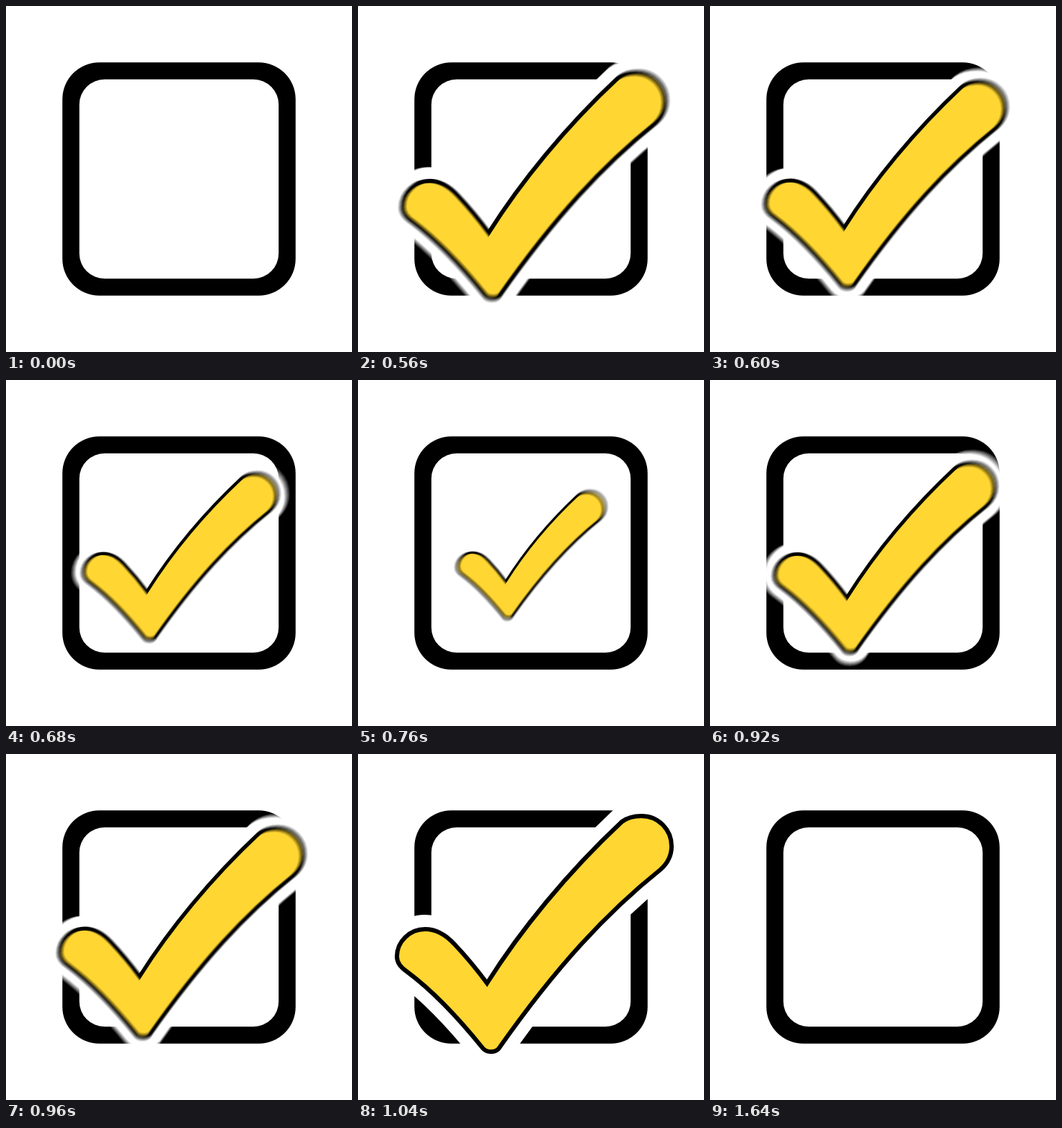
An HTML page with a canvas for the animation above (2000 ms loop, 480 px wide and 480 px high).

```html
<!DOCTYPE html>
<html lang="en">
<head>
<meta charset="utf-8">
<title>Checkbox</title>
<style>
  html, body { margin: 0; width: 100%; height: 100%; overflow: hidden; background: #fff; }
  canvas { display: block; width: 100vmin; height: 100vmin; }
</style>
</head>
<body>
<canvas id="stage" width="480" height="480"></canvas>
<script>
const SIZE = 480, LOOP = 2000, STEP = 40;
const SHOW = 560, HIDE = 1640;
const PIVOT = 235, MIN_SCALE = 0.5;
const START = -0.5, TURN = 5.42, END = 11.35; // in steps after SHOW
const SHUTTER = 0.5, SAMPLES = 16;

const ctx = document.getElementById('stage').getContext('2d');
const layer = document.createElement('canvas');
layer.width = layer.height = SIZE;
const pen = layer.getContext('2d');

const box = new Path2D();
box.roundRect(78.25, 78.25, 323.5, 323.5, 51);
box.roundRect(101.75, 101.75, 276.5, 276.5, 35);

const tick = new Path2D(`M93 243
  C109 243 122 251 134 264 C151 282 165 299 179 318
  C225 245 290 165 366 94 C374 88 383 86 393 86
  C417 86 435 105 435 128 C435 141 430 151 420 160
  C345 220 275 295 195 409 C190 414.5 178 414.5 173 408
  C140 367 107 331 68 302 C59 296 54 289 54 281
  C54 260 72 243 93 243 Z`);

// Linear shrink, then linear growth back to full size.
function scaleAt(step) {
  const p = step < TURN
    ? (TURN - step) / (TURN - START)
    : (step - TURN) / (END - TURN);
  return MIN_SCALE + (1 - MIN_SCALE) * Math.min(1, p);
}

function strokeTick(color, width) {
  pen.strokeStyle = color;
  pen.lineWidth = width;
  pen.stroke(tick);
}

function drawScene(scale) {
  pen.setTransform(1, 0, 0, 1, 0, 0);
  pen.fillStyle = '#fff';
  pen.fillRect(0, 0, SIZE, SIZE);
  pen.fillStyle = '#000';
  pen.fill(box, 'evenodd');
  if (!scale) return;

  pen.translate(PIVOT, PIVOT);
  pen.scale(scale, scale);
  pen.translate(-PIVOT, -PIVOT);
  strokeTick('#fff', 40);
  pen.fillStyle = '#ffd632';
  pen.fill(tick);
  strokeTick('#000', 6);
}

function blit(alpha) {
  ctx.globalAlpha = alpha;
  ctx.drawImage(layer, 0, 0);
}

function render(t) {
  if (t < SHOW || t >= HIDE) {
    drawScene(0);
    blit(1);
    return;
  }
  const step = Math.floor((t - SHOW) / STEP);
  if (step > END) {
    drawScene(1);
    blit(1);
    return;
  }
  // Motion blur: running average over the open shutter.
  for (let i = 0; i < SAMPLES; i++) {
    drawScene(scaleAt(step + SHUTTER * ((i + 0.5) / SAMPLES - 0.5)));
    blit(1 / (i + 1));
  }
}

const origin = performance.now();
function loop() {
  render((performance.now() - origin) % LOOP);
  requestAnimationFrame(loop);
}
loop();
</script>
</body>
</html>
```
